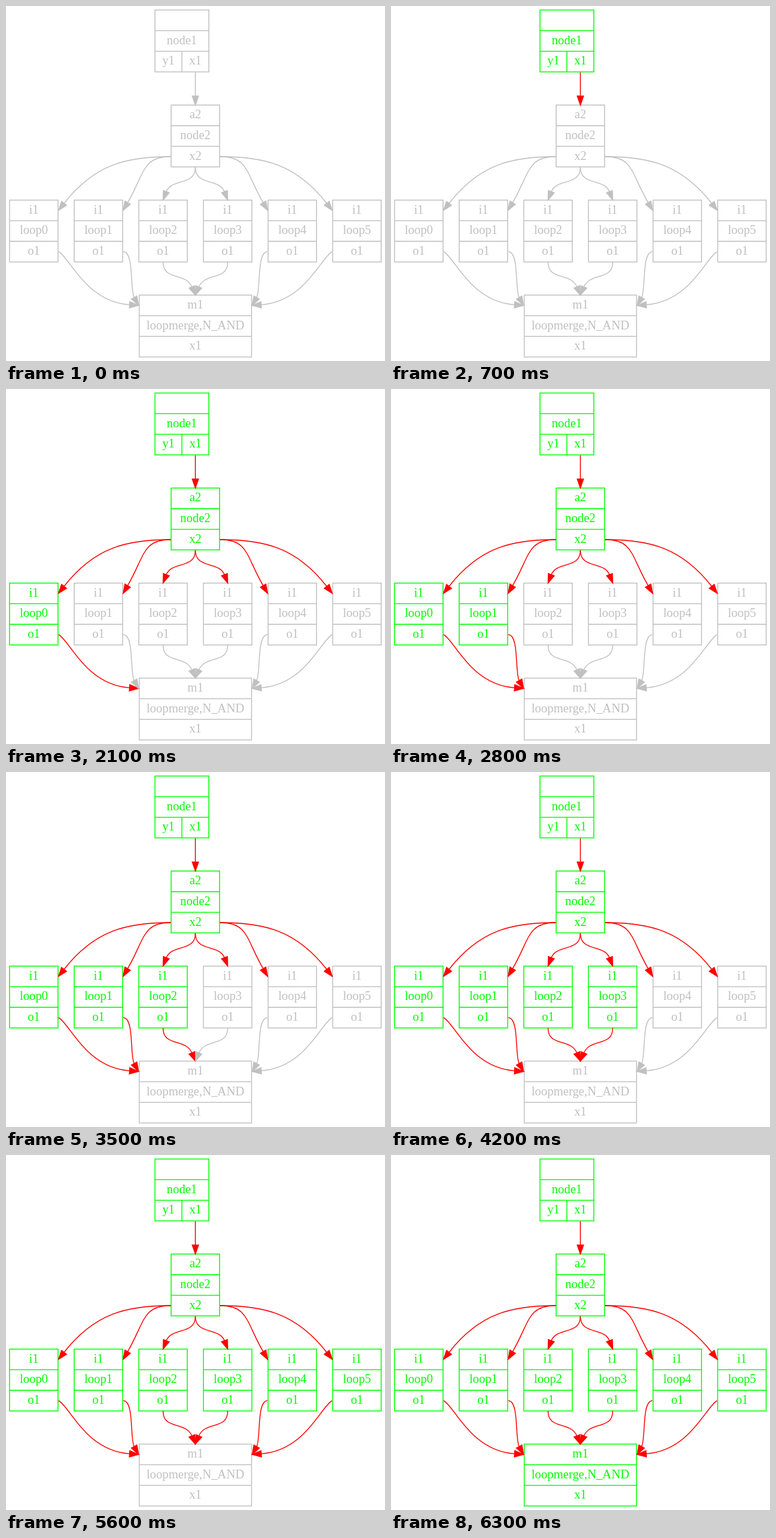
An HTML page with a canvas that plays this animation: 563x528 px, repeating every 7000 ms.

```html
<!DOCTYPE html>
<html lang="en">
<head>
<meta charset="utf-8">
<title>Graph run</title>
<style>
html, body { margin: 0; width: 100%; height: 100%; overflow: hidden; background: #fff; }
canvas { display: block; }
</style>
</head>
<body>
<canvas id="stage" width="563" height="528"></canvas>
<script>
const ctx = document.getElementById('stage').getContext('2d');
const STEP = 700, STEPS = 10;
const IDLE = '#c0c0c0', DONE = '#00ff00', SENT = '#ff0000';
const MID = 281.33, GAP = 96, ROW = 92 / 3, RANK = 424 / 3;
const HEAD = 13.33, HALF_HEAD = 4.67;

const rankTop = rank => 6 + RANK * rank;
const rowMid = (rank, row) => rankTop(rank) + ROW * (row + 0.5);
const loopX = i => MID + GAP * (i - 2.5);

// Boxes light up one per step, in list order.
const nodes = [
  { x: MID - 20, rank: 0, w: 80, rows: [[''], ['node1'], ['y1', 'x1']] },
  { x: MID, rank: 1, w: 72, rows: [['a2'], ['node2'], ['x2']] }
];
for (let i = 0; i < 6; i++) {
  nodes.push({ x: loopX(i), rank: 2, w: 72, rows: [['i1'], ['loop' + i], ['o1']] });
}
nodes.push({ x: MID, rank: 3, w: 166.67, rows: [['m1'], ['loopmerge,N_AND'], ['x1']] });

// An edge leaves `start` and lands on `tip`; angles in degrees, pull and reach are handle lengths.
const edge = (start, leave, pull, tip, land, reach) => ({ start, leave, pull, tip, land, reach });
const flip = ([x, y]) => [2 * MID - x, y];
const mirror = e => edge(flip(e.start), 180 - e.leave, e.pull, flip(e.tip), 180 - e.land, e.reach);
const bothSides = half => half.concat(half.map(mirror).reverse());

const hub = [MID - 36.7, rowMid(1, 2)];
const merge = [MID - 84.5, rowMid(3, 0)];
const loopIn = i => [loopX(i) + 36.7, rowMid(2, 0)];
const loopOut = i => [loopX(i) + 37, rowMid(2, 2)];

const fanOut = [
  edge(hub, 180, 65, loopIn(0), 128, 74),
  edge(hub, 180, 42, loopIn(1), 120, 52),
  edge([MID, rankTop(2) - 48.7], 90, 28, [loopX(2), rankTop(2)], 111, 22)
];
const fanIn = [
  edge(loopOut(0), 30, 20, merge, 4, 65),
  edge(loopOut(1), 0, 16, merge, 61, 13),
  edge([loopX(2), rankTop(3) - 49], 90, 28, [MID, rankTop(3)], 67, 24)
];
const edges = [
  { from: 0, ...edge([MID, rankTop(1) - 48.7], 90, 10, [MID, rankTop(1)], 90, 10) },
  ...bothSides(fanOut).map(e => ({ from: 1, ...e })),
  ...bothSides(fanIn).map((e, i) => ({ from: 2 + i, ...e }))
];

function move([x, y], degrees, length) {
  const a = degrees * Math.PI / 180;
  return [x + Math.cos(a) * length, y + Math.sin(a) * length];
}

function line(x1, y1, x2, y2) {
  ctx.beginPath();
  ctx.moveTo(x1, y1);
  ctx.lineTo(x2, y2);
  ctx.stroke();
}

function drawNode({ x, rank, w, rows }, color) {
  const left = x - w / 2, top = rankTop(rank);
  ctx.strokeStyle = ctx.fillStyle = color;
  ctx.strokeRect(left, top, w, ROW * 3);
  rows.forEach((cells, r) => {
    const y = top + ROW * r, cw = w / cells.length;
    if (r) line(left, y, left + w, y);
    cells.forEach((label, c) => {
      const cx = left + cw * c;
      if (c) line(cx, y, cx, y + ROW);
      ctx.fillText(label, cx + cw / 2, Math.floor(y + ROW / 2 + 5.3));
    });
  });
}

function drawEdge({ start, leave, pull, tip, land, reach }, color) {
  const base = move(tip, land, -HEAD);
  ctx.strokeStyle = ctx.fillStyle = color;
  ctx.beginPath();
  ctx.moveTo(...start);
  ctx.bezierCurveTo(...move(start, leave, pull), ...move(base, land, -reach), ...base);
  ctx.stroke();

  ctx.beginPath();
  ctx.moveTo(...tip);
  ctx.lineTo(...move(base, land + 90, HALF_HEAD));
  ctx.lineTo(...move(base, land - 90, HALF_HEAD));
  ctx.closePath();
  ctx.fill();
  ctx.stroke();
}

function draw(step) {
  ctx.fillStyle = '#fff';
  ctx.fillRect(0, 0, 563, 528);
  ctx.lineWidth = 4 / 3;
  ctx.font = '18.4px "Liberation Serif", Times, serif';
  ctx.textAlign = 'center';
  nodes.forEach((n, i) => drawNode(n, i < step ? DONE : IDLE));
  edges.forEach(e => drawEdge(e, e.from < step ? SENT : IDLE));
}

const begin = performance.now();
function tick() {
  draw(Math.floor((performance.now() - begin) / STEP) % STEPS);
  requestAnimationFrame(tick);
}
tick();
</script>
</body>
</html>
```
